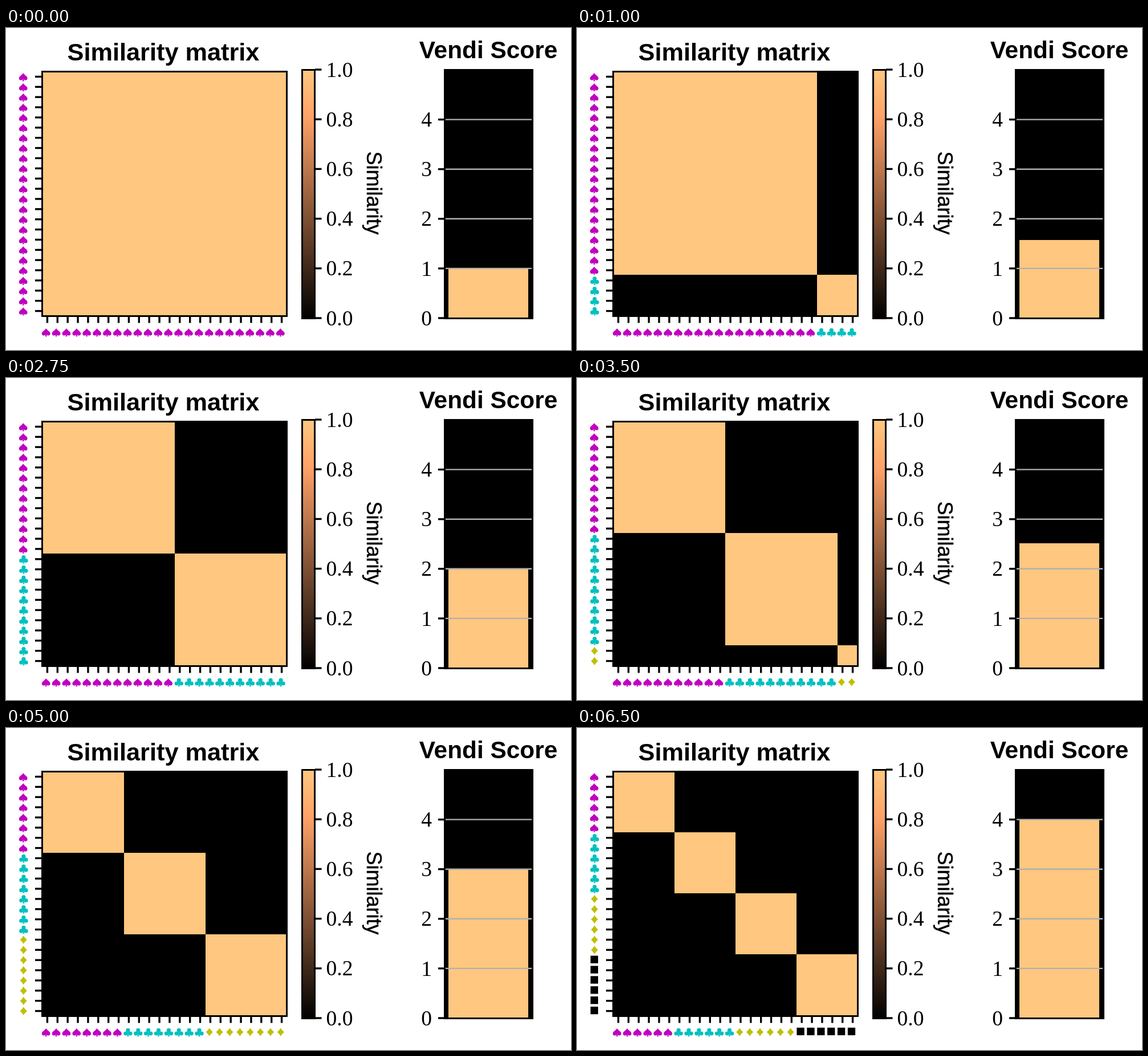
Write an HTML page that moves like this. It is 991x565 px and loops after 6.75 s.

```html
<!DOCTYPE html>
<html lang="en">
<head>
<meta charset="utf-8">
<title>Similarity matrix</title>
<style>
html, body { margin: 0; width: 100%; height: 100%; overflow: hidden; background: #fff; }
svg { display: block; width: 100%; height: 100%; }
.title { font: bold 43.3px "Liberation Sans", Arial, sans-serif; text-anchor: middle; }
.num { font: 37.6px "Liberation Serif", "Times New Roman", serif; }
.axis { font: 36px "Liberation Sans", Arial, sans-serif; text-anchor: middle; stroke: #000; stroke-width: .5; }
.frame { fill: none; stroke: #000; stroke-width: 3; }
.tick { stroke: #000; stroke-width: 3.4; }
.grid { stroke: #b0b0b0; stroke-width: 2.4; }
</style>
</head>
<body>
<svg viewBox="0 0 991 565">
  <defs>
    <linearGradient id="copper" x1="0" y1="1" x2="0" y2="0">
      <stop offset="0" stop-color="#000"/>
      <stop offset=".81" stop-color="#ffa167"/>
      <stop offset="1" stop-color="#ffc77f"/>
    </linearGradient>
    <path id="spade" fill="#bf00bf" d="M-.3-7.2C1.4-3.2 7.1-1.7 7.1 2.2C7.1 4.5 5.6 5.6 3.9 5.6C2.4 5.6 1.2 5 .4 4C.5 5.6.9 6.6 1.7 7.2H-2.3C-1.5 6.6-1.1 5.6-1 4C-1.8 5-3 5.6-4.5 5.6C-6.2 5.6-7.7 4.5-7.7 2.2C-7.7-1.7-2-3.2-.3-7.2Z"/>
    <g id="club" fill="#00bfbf" transform="translate(.4 0)">
      <circle cy="-3.7" r="3.6"/><circle cx="-4.1" cy="2" r="3.6"/><circle cx="4.1" cy="2" r="3.6"/>
      <path d="M-.7-2H.7L1 1.2L3 1.2V2.4L.8 2.6C.8 5 1.1 6.4 2 7.2H-2C-1.1 6.4-.8 5-.8 2.6L-3 2.4V1.2L-1 1.2Z"/>
    </g>
    <path id="diamond" fill="#bfbf00" d="M.2-7.6Q2.8-3.4 6.3-.4Q2.8 2.6.2 6.8Q-2.4 2.6-5.9-.4Q-2.4-3.4.2-7.6Z"/>
    <rect id="square" x="-6.8" y="-8.2" width="13.3" height="13.3"/>
  </defs>
  <rect width="991" height="565" fill="#fff"/>
  <g id="stage"></g>
</svg>
<script>
const COUNT = 24, STEP = 250, STEPS = 27;
const SUITS = ["spade", "club", "diamond", "square"];
const LIGHT = { fill: "#ffc77f", "shape-rendering": "crispEdges" };
const left = 63.5, top0 = 76.5, size = 429, cell = size / COUNT;
const base = 509, unit = 87.1;
const stage = document.getElementById("stage");

function add(tag, attrs, text) {
  const el = document.createElementNS("http://www.w3.org/2000/svg", tag);
  set(el, attrs);
  if (text !== undefined) el.textContent = text;
  return stage.appendChild(el);
}
function set(el, attrs) {
  for (const key in attrs) el.setAttribute(key, attrs[key]);
}
const box = (x, y, width, height, more) => add("rect", { x, y, width, height, ...more });
const line = (x1, y1, x2, y2, cls) => add("line", { x1, y1, x2, y2, class: cls });
const label = (x, y, cls, text, more) => add("text", { x, y, class: cls, ...more }, text);

// Similarity matrix
label(276, 57, "title", "Similarity matrix");
box(left, top0, size, size);
const blocks = SUITS.map(() => box(0, 0, 0, 0, LIGHT));
box(left, top0, size, size, { class: "frame" });
const rows = [], cols = [];
for (let i = 0; i < COUNT; i++) {
  const x = left + (i + .5) * cell, y = top0 + (i + .5) * cell;
  line(51, y, left, y, "tick");
  line(x, top0 + size, x, 517.5, "tick");
  rows.push(add("use", { x: 30.5, y: 86 + i * cell }));
  cols.push(add("use", { x: 70.5 + i * cell, y: 534 }));
}

// Colour bar
box(519.5, 73.5, 22, 436, { fill: "url(#copper)" });
box(519.5, 73.5, 22, 436, { class: "frame" });
for (let i = 0; i <= 5; i++) {
  const y = base - i * 87.2;
  line(542, y, 553.5, y, "tick");
  label(561.5, y + 12.6, "num", (i / 5).toFixed(1));
}
label(0, 0, "axis", "Similarity", { transform: "translate(632.5 289.5) rotate(90)" });

// Score bar
label(846, 53.3, "title", "Vendi Score", { style: "font-size:42.4px" });
box(769.5, 73.5, 154, 436);
const bar = box(776.3, 0, 139.9, 0, LIGHT);
for (let i = 0; i <= 4; i++) {
  const y = base - i * unit;
  if (i) line(771, y, 922, y, "grid");
  line(758, y, 770, y, "tick");
  label(747, y + 12.6, "num", i, { "text-anchor": "end" });
}
box(769.5, 73.5, 154, 436, { class: "frame" });

// Each phase grows one new class until all classes are equal
function counts(k) {
  const start = k <= 12 ? 0 : k <= 20 ? 12 : 20;
  const old = k <= 12 ? 1 : k <= 20 ? 2 : 3;
  const fresh = k - start, rest = COUNT - fresh;
  const list = [];
  for (let i = 0; i < old; i++) list.push(Math.floor(rest / old) + (i < rest % old ? 1 : 0));
  return [...list, fresh];
}

function score(list) {
  let entropy = 0;
  for (const n of list) if (n) entropy -= n / COUNT * Math.log(n / COUNT);
  return Math.exp(entropy);
}

function draw(k) {
  const list = counts(k);
  let at = 0;
  blocks.forEach((block, s) => {
    const n = list[s] || 0;
    // The fill sits a pixel above the frame's own grid
    set(block, { x: left + at * cell, y: top0 - 1 + at * cell, width: n * cell, height: n * cell });
    for (let i = at; i < at + n; i++) {
      set(rows[i], { href: "#" + SUITS[s] });
      set(cols[i], { href: "#" + SUITS[s] });
    }
    at += n;
  });
  const height = score(list) * unit;
  set(bar, { y: base - .4 - height, height });
}

const begin = performance.now();
let shown = -1;
function tick() {
  const k = Math.floor((performance.now() - begin) / STEP) % STEPS;
  if (k !== shown) draw(shown = k);
  requestAnimationFrame(tick);
}
tick();
</script>
</body>
</html>
```
